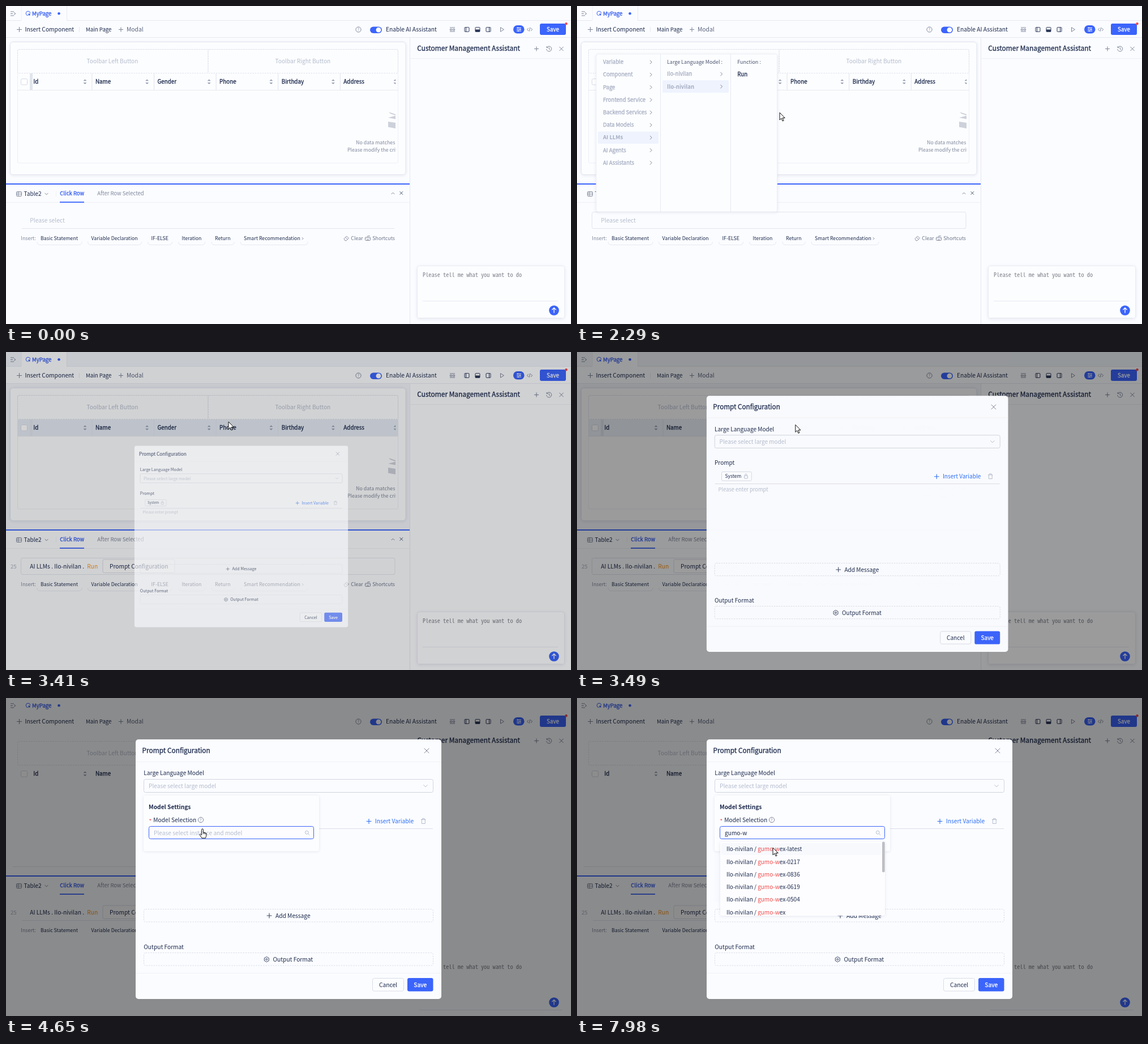
An HTML page for the animation above (8000 ms loop, 998 px wide and 561 px high).

```html
<!DOCTYPE html>
<html lang="en">
<head>
<meta charset="utf-8">
<title>Prompt setup</title>
<style>
html, body { margin: 0; width: 100%; height: 100%; overflow: hidden; background: #fbfcff; }
svg { display: block; width: 100vw; height: 100vh; }
text { font-family: "Noto Sans CJK SC", "Noto Sans CJK JP", "Noto Sans", sans-serif; white-space: pre; }
.mono { font-family: "Noto Sans Mono CJK SC", "Noto Sans Mono CJK JP", "Liberation Mono", monospace; }
.medium { stroke-width: .28; }
.dimmed .faint { visibility: hidden; }
</style>
</head>
<body>
<svg id="stage" viewBox="0 0 998 561" preserveAspectRatio="none"></svg>
<script>
const INK = '#1c2a4c', GREY = '#7f879b', PALE = '#b4bccd', LINE = '#e6e9f1', BLUE = '#3b64fb', RED = '#f04a4a';
const VENDOR = 'Ilo-nivilan';

// y is the middle of the capitals
const text = (x, y, size, str, fill = INK, weight = 400, more = '') =>
  `<text x="${x}" y="${y + size * 0.365}" font-size="${size}" fill="${fill}" font-weight="${weight}" ${more}>${str}</text>`;
const medium = (x, y, size, str, fill = INK, more = '') =>
  text(x, y, size, str, fill, 400, `class="medium" stroke="${fill}" ${more}`);
const rect = (x, y, w, h, fill = 'none', stroke = 'none', r = 0, more = '') =>
  `<rect x="${x}" y="${y}" width="${w}" height="${h}" rx="${r}" fill="${fill}" stroke="${stroke}" ${more}/>`;
const path = (d, stroke = GREY, w = 1, fill = 'none', more = '') =>
  `<path d="${d}" stroke="${stroke}" stroke-width="${w}" fill="${fill}" ${more}/>`;
const circle = (x, y, r, fill, stroke = 'none') =>
  `<circle cx="${x}" cy="${y}" r="${r}" fill="${fill}" stroke="${stroke}"/>`;
const hline = (x1, x2, y, c = LINE) => path(`M${x1} ${y}H${x2}`, c);
const vline = (x, y1, y2, c = LINE) => path(`M${x} ${y1}V${y2}`, c);
const group = (id, ...parts) => `<g id="${id}">${parts.join('')}</g>`;
const faint = (...parts) => `<g class="faint">${parts.join('')}</g>`;
const plus = (x, y, r, c = GREY) => path(`M${x - r} ${y}h${2 * r}M${x} ${y - r}v${2 * r}`, c, 1.1);
const cross = (x, y, r, c = GREY) => path(`M${x - r} ${y - r}l${2 * r} ${2 * r}M${x + r} ${y - r}l${-2 * r} ${2 * r}`, c, 1);
const right = (x, y, r, c = GREY) => path(`M${x - r / 2} ${y - r}l${r} ${r}l${-r} ${r}`, c);
const down = (x, y, r, c = GREY) => path(`M${x - r} ${y - r / 2}l${r} ${r}l${r} ${-r}`, c);
const help = (x, y) => circle(x, y, 4.6, 'none', GREY) + text(x, y, 7, '?', GREY, 400, 'text-anchor="middle"');
const dash = 'stroke-dasharray="2.5 1.8"';
const shade = 'filter="url(#shadow)"';
const middle = 'text-anchor="middle"';

function header() {
  return faint(hline(0, 998, 25.5)) + rect(27, 0, 80, 26, '#fbfcff') +
    faint(vline(27.5, 0, 25, '#f0f2f7'), vline(107.5, 0, 25)) +
    path('M8 10h6M8 13.500h4M8 17h6M14 11.500l3 2-3 2') +
    circle(39, 13, 3.8, 'none', BLUE) + rect(39, 13, 4, 4, BLUE, '#fbfcff', 1) +
    medium(46, 13, 9.6, 'MyPage', '#3059ee') + circle(93.5, 13.3, 2.3, BLUE) +
    plus(23.5, 41.5, 4.5) + text(33.5, 41.5, 10.25, 'Insert Component') + faint(vline(129.5, 37, 46)) +
    text(141, 41.5, 9.6, 'Main Page') + plus(203, 41.5, 4) + text(213, 41.5, 10.3, 'Modal', '#5c667f') +
    help(622.5, 41.5) + rect(643, 36.5, 21, 11.5, BLUE, 'none', 5.75) + circle(658, 42.2, 4.4, '#fff') +
    text(671, 41.5, 10.25, 'Enable AI Assistant') +
    path('M784 38h9M784 45h9M784.500 40.500h3v2.500h-3zM789.500 40.500h3v2.500h-3z') +
    [814, 833, 852].map(x => rect(x - 4, 37.7, 8, 7.6, 'none', '#2a3758', 1)).join('') +
    vline(812.5, 38, 45, '#2a3758') + rect(829, 41.5, 8, 4, '#2a3758') + vline(853.5, 38, 45, '#2a3758') +
    path('M873.500 37.800v7.400l6-3.700z') +
    rect(896, 34, 19.5, 14.5, BLUE, 'none', 7.2) +
    path('M902 38.500h8M902 41.300h8M902 44h8', '#fff') + path('M904 37.500v2M908 40.300v2M905 43v2', '#fff', 1.5) +
    path('M923 38.800l-2.600 2.600 2.600 2.600M927 38.800l2.600 2.600-2.600 2.600M925.800 37.800l-1.600 7') +
    rect(943, 31, 46, 20, BLUE, 'none', 3) + medium(966, 41.2, 9.8, 'Save', '#fff', middle) +
    circle(989.5, 31.3, 2.2, '#f4484d') + faint(hline(0, 998, 55.5));
}

function table() {
  const cols = ['Id', 'Name', 'Gender', 'Phone', 'Birthday', 'Address'];
  let s = faint(rect(7.5, 63.5, 698.5, 234, '#fcfdff', '#dfe4ee', 5, shade), rect(20.5, 76.5, 672, 200.5, 'none', '#eceff5', 3)) +
    hline(12, 702, 297.5, '#dfe4ee') + group('headTint', rect(20, 119, 673, 29, '#e6ecf5')) +
    rect(20.5, 76.5, 336.5, 42, 'none', '#dde1ea', 2, dash) + rect(357, 76.5, 335.5, 42, 'none', '#dde1ea', 2, dash) +
    text(142.5, 97.5, 10.1, 'Toolbar Left Button', PALE) + text(475.5, 97.5, 10.1, 'Toolbar Right Button', PALE) +
    rect(26.5, 128.5, 11, 10.5, '#fff', '#d5dae5', 2) + faint(hline(20, 693, 148.5), rect(42, 119, 5, 29, '#e1e5ee'));
  cols.forEach((c, i) => {
    const x = 48.3 + i * 109.6;
    s += medium(x, 133.3, 9.85, c);
    s += path(`M${x + 88.2} 132.300l3-3 3 3zM${x + 88.2} 134.900l3 3 3-3z`, 'none', 0, '#98a0b4', 'clip-path="url(#tableClip)"');
    if (i) s += faint(vline(x - 6, 119, 148, '#dfe3ec'));
  });
  return s + `<g clip-path="url(#tableClip)">` +
    path('M676 187l12 4v2l-9-3zM675 197l13-3.500v6zM675 204l13 2v10l-13-2.500z', 'none', 0, '#cdd1da') +
    text(618, 240.5, 8.85, 'No data matches', GREY) + text(603, 253.5, 8.75, 'Please modify the criteria', GREY) + '</g>';
}

function editor() {
  const chips = [[61, 67, 'Basic Statement'], [150.5, 83, 'Variable Declaration'], [256.5, 31, 'IF-ELSE'],
    [310.5, 35, 'Iteration'], [369, 28, 'Return'], [420, 107, 'Smart Recommendation']];
  return rect(0, 313, 713, 2, BLUE) +
    rect(18.5, 327.5, 9, 8, 'none', GREY, 1) + path('M18.500 330h9M18.500 332.700h9M21.500 328v7.500', GREY, 0.8) +
    text(31.5, 331, 10.1, 'Table2') + down(71.5, 331.5, 2.8) + faint(vline(88.5, 327, 336, '#eef0f5')) +
    medium(95.3, 331, 9.5, 'Click Row', '#3059ee') + text(161.3, 331, 9.45, 'After Row Selected', GREY) +
    path('M680.700 332l2.800-2.800 2.800 2.800') + cross(698.3, 330, 2.8, '#4d5871') +
    faint(hline(0, 713, 346.5, '#edf0f5')) + rect(95, 345.2, 43, 1.8, BLUE) +
    group('lineNo', text(8, 378, 9.6, '25', '#a9b0c0')) +
    hline(28, 686, 392.5, '#e1e5ed') + group('field', faint(rect(26.5, 363.5, 660.5, 29, 'none', '#e1e5ed', 3))) +
    group('hint', text(42.3, 378, 10.25, 'Please select', PALE)) +
    group('statement', text(42.3, 378, 10.2, `AI LLMs . ${VENDOR} .`), text(143.3, 378, 10.2, 'Run', '#f7941d'),
      rect(171, 366, 127, 23.5, '#fdfdff', '#d9dde7', 2.5), text(183, 378, 10.2, 'Prompt Configuration')) +
    text(26.3, 410, 8.9, 'Insert:', GREY) +
    chips.map(([x, w, s]) => faint(path(`M${x - 6} 416q0 5.500 6 5.500h${w}q6 0 6-5.500`, LINE)) + text(x, 410, 8.75, s)).join('') +
    right(524, 410.3, 2) +
    path('M597 410.500l4.500-4.500 4 3.500-4.500 4.500h-2zM599.500 408l4 4', GREY, 0.9) + text(609.3, 410, 8.8, 'Clear', '#6b7489') +
    rect(634.5, 408, 9, 5.5, 'none', GREY, 1) + path('M636 410h1M638.500 410h1M641 410h1M637 412h4M639 408v-2.500h4', GREY, 0.8) +
    text(647.3, 410, 8.8, 'Shortcuts', '#6b7489');
}

function assistant() {
  return faint(vline(713.5, 56, 561, '#e4e8f0')) + medium(726.3, 75, 11.9, 'Customer Management Assistant') +
    plus(937, 75.5, 4) + path('M955.500 73a4.500 4.500 0 1 1-.8 3M955 71v2.500h2.500M959.300 73v3l2 1') + cross(981, 75.5, 3.6) +
    faint(hline(714, 998, 92.5, '#edf0f5'), rect(726.5, 458.5, 260, 92.5, '#fcfdff', '#e9ecf3', 4, shade), hline(736, 975, 520.5)) +
    hline(730, 982, 550.5, '#e3e7ef') +
    text(736, 474, 10.3, 'Please tell me what you want to do', '#7c7f88', 400, 'class="mono"') +
    circle(968, 537, 8.8, BLUE) + path('M968 541.500v-8.500M964.500 536l3.500-3.500 3.500 3.500', '#fff', 1.3);
}

function menu() {
  const items = ['Variable', 'Component', 'Page', 'Frontend Service', 'Backend Services', 'Data Models', 'AI LLMs', 'AI Agents', 'AI Assistants'];
  const dim = '#a4acc0';
  return group('menu',
    `<rect id="pane" x="34" y="85" width="114" height="278" rx="3" fill="#fcfdff" stroke="#eceff5" ${shade}/>`,
    group('pick1', rect(37, 221.5, 107, 21.5, '#eff3fe', 'none', 2)),
    items.map((s, i) => (s === 'AI LLMs' ? text(46, 98.7 + i * 22.2, 9.5, s, dim, 700) : medium(46, 98.7 + i * 22.2, 9.5, s, dim)) +
      right(130.5, 99 + i * 22.2, 3.2)).join(''),
    group('col2', vline(147.5, 85, 363), text(159, 98.5, 8.95, 'Large Language Model :', '#4c5670'),
      group('pick2', rect(151, 131, 117, 22, '#eff3fe', 'none', 2)),
      medium(159, 120, 9.5, VENDOR, dim), text(159, 142, 9.6, VENDOR, dim, 700), right(255, 120, 3.2), right(255, 142, 3.2)),
    group('col3', vline(271.5, 85, 363), text(283.3, 98.5, 9, 'Function :', '#4c5670'), medium(283.3, 120, 9.7, 'Run')));
}

function modal() {
  return group('modal',
    rect(229, 73, 540, 458, '#fbfcff', 'none', 5),
    medium(240.6, 93, 11.85, 'Prompt Configuration'), cross(743, 93, 4.3), hline(229, 769, 112.5, '#f0f2f6'),
    text(243.3, 132.7, 10.2, 'Large Language Model'), rect(243.5, 143.5, 511, 23, '#fbfcff', '#d0d5df', 3),
    group('focus', rect(243.5, 143.5, 511, 23, 'none', '#a3c0dc', 3)),
    text(252, 155.3, 10.15, 'Please select large model', PALE), down(741, 155, 3.6, PALE),
    text(243.3, 192.7, 10.2, 'Prompt'), rect(256, 209, 53.5, 16, '#fcfdff', '#d5dae4', 2), text(262, 217, 8.6, 'System'),
    rect(296.5, 216, 6, 4.8, 'none', PALE, 0.7), path('M297.800 216v-1.500q0-1.700 1.700-1.700t1.700 1.700v1.500', PALE),
    plus(641, 217.5, 4.4, '#2a6df5'), text(651.8, 217.3, 10.2, 'Insert Variable', '#2a6df5'),
    path('M733 214.500h8.500M735.500 214.300v-1.700h3.500v1.700M734.300 214.500v7h6v-7', PALE),
    hline(244, 754, 230.5, '#d9dee8'), text(250, 241, 9.45, 'Please enter prompt', PALE),
    rect(243.5, 372.5, 511, 22.5, 'none', '#d9dde6', 3, dash), plus(465, 384, 4.4, '#3c4864'), text(476, 384, 10.2, 'Add Message'),
    text(243.3, 439, 10.2, 'Output Format'), rect(243.5, 449.5, 511, 22.5, 'none', '#d9dde6', 3, dash),
    path('M460.300 456.500l4 2.300v4.600l-4 2.300-4-2.300v-4.600z', '#3c4864'), circle(460.3, 461.1, 1.5, 'none', '#3c4864'),
    text(471.5, 461.3, 10.2, 'Output Format'), hline(229, 769, 485.5, '#f0f2f6'),
    rect(647.5, 494.5, 55, 22.5, '#fcfdff', '#d9dde6', 3), text(675, 506, 10.2, 'Cancel', INK, 400, middle),
    rect(709, 494, 45.5, 23.5, BLUE, 'none', 3), medium(731.7, 506, 10.2, 'Save', '#fff', middle));
}

function settings() {
  const models = ['vab-wex-latest', 'vab-wex', 'vob-glen-0712', 'vob-glen', 'vob-48k', 'loamfern-t4'];
  const row = i => 266.7 + i * 22.25;
  return group('glow', rect(243, 270, 276, 90, '#f8faff')) + group('settings',
    rect(243, 172, 310, 98, '#fcfdff', 'none', 4, shade),
    text(252, 192.5, 10.2, 'Model Settings', INK, 700), text(252.5, 217, 10, '*', RED),
    text(260.3, 215.3, 10.2, 'Model Selection'), help(344, 215),
    rect(252.5, 226.5, 291, 22, '#fdfdff', BLUE, 3),
    circle(531.3, 237.2, 2.9, 'none', PALE), path('M533.500 239.500l2.500 2.500', PALE),
    group('ask', text(261, 238, 10.2, 'Please select instance and model', PALE)),
    `<text id="typed" x="261" y="241.700" font-size="10.200" fill="${INK}"></text>`, group('caret', vline(0, 232, 244.5, INK))) +
  group('tree', group('narrow', rect(253, 253, 83, 131, '#fdfdff', 'none', 3, shade)),
    group('branch', rect(253, 253, 255, 131, '#fdfdff', 'none', 3, shade), vline(335.5, 253, 384, '#eef0f5'),
      rect(339, 256, 158, 21, '#f7f9fd', 'none', 2),
      `<g clip-path="url(#dropClip)">${models.map((m, i) => text(348, row(i), 10, m)).join('')}</g>`,
      rect(503.3, 253, 4.7, 11, '#bdbfc4', 'none', 2.3)),
    rect(255, 256, 77, 21.5, '#edf2fe', 'none', 2), text(264, 266.7, 9.8, VENDOR, INK, 700), right(319.5, 267, 2.8, PALE)) +
  group('found', rect(253, 253, 291, 131, '#fdfdff', 'none', 3, shade), rect(255, 256, 282, 21, '#f7f9fd', 'none', 2),
    `<g id="hits" clip-path="url(#dropClip)"></g>`, rect(539, 253.5, 4.7, 54, '#bdbfc4', 'none', 2.3));
}

function hits(key) {
  return ['-latest', '-0217', '-0836', '-0619', '-0504', ''].map((end, i) => {
    const rest = ('gumo-wex' + end).slice(key.length);
    return text(264, 266.7 + i * 22.25, 10, `${VENDOR} / <tspan fill="${RED}">${key}</tspan>${rest}`);
  }).join('');
}

const stage = document.getElementById('stage');
stage.innerHTML = `<defs>
  <filter id="shadow" x="-10%" y="-10%" width="120%" height="125%"><feDropShadow dx="0" dy="1" stdDeviation="2.5" flood-color="#2b3a66" flood-opacity=".09"/></filter>
  <clipPath id="tableClip"><rect x="20" y="119" width="668.300" height="158"/></clipPath>
  <clipPath id="dropClip"><rect x="253" y="253" width="291" height="131"/></clipPath></defs>` +
  rect(0, 0, 998, 561, '#fbfcff') +
  group('tint', rect(0, 0, 998, 25, '#eff3f9'), rect(0, 56, 713, 257, '#f1f4fa')) +
  header() + table() + editor() + assistant() + menu() +
  group('mask', rect(0, 0, 998, 561, '#000')) + modal() + settings() +
  group('cursor',
    group('arrow', path('M0 0V13l3-2.800 2.100 4.800 2-.9-2-4.600h4.100z', '#111', 1, '#fff')),
    group('hand', path('M-1.400 1.200a1.400 1.400 0 0 1 2.800 0V6l4 .9q1.800.4 1.600 2.400l-.6 4-.9 2.700h-6.600l-3.400-5.200q-.9-1.500.2-1.900.9-.3 1.500.6l1.400 1.400z', '#111', 1, '#fff'),
      path('M1.400 6v3M3.400 6.700v2.500M5.300 7.200v2.300', '#111', 0.8)));

const el = {};
stage.querySelectorAll('[id]').forEach(e => { el[e.id] = e; });

const clamp = v => Math.max(0, Math.min(1, v));
const ramp = (t, a, b) => clamp((t - a) / (b - a));
const within = (t, a, b) => t >= a && t < b;
const fade = (id, v) => {
  el[id].setAttribute('opacity', +v);
  el[id].setAttribute('display', v > 0 ? 'inline' : 'none');
};

// time, x, y
const route = [[40, 235, 497], [240, 150, 377], [890, 150, 377], [1290, 100, 231], [1450, 106, 231], [1690, 215, 142],
  [1770, 215, 142], [1970, 292, 119], [2210, 292, 119], [2290, 358, 188], [2570, 320, 320], [2930, 222, 380],
  [3090, 222, 380], [3370, 355, 101], [3410, 393, 123], [3730, 347, 157], [4250, 347, 157], [4730, 347, 237],
  [4970, 347, 237], [5250, 300, 265], [5570, 347, 266], [5770, 347, 266], [5890, 347, 264], [7900, 347, 264], [7980, 346, 264]];

function pointer(t) {
  let i = route.findIndex(p => p[0] > t);
  if (i < 0) return route[route.length - 1].slice(1);
  if (i === 0) i = 1;
  const [a, b] = [route[i - 1], route[i]];
  const p = ramp(t, a[0], b[0]), e = p * p * (3 - 2 * p);
  return [a[1] + (b[1] - a[1]) * e, a[2] + (b[2] - a[2]) * e];
}

let lastKey = null;
function draw(t) {
  fade('field', within(t, 80, 2450) || t >= 3400);
  fade('lineNo', t < 2450 ? ramp(t, 40, 200) * (1 - ramp(t, 930, 1090)) : 1);
  fade('hint', t < 2450);
  fade('statement', t >= 2450);

  const second = ramp(t, 1270, 1370), third = ramp(t, 1730, 1850);
  fade('menu', ramp(t, 530, 690) * (1 - ramp(t, 2330, 2450)));
  el.pane.setAttribute('width', third ? 319.5 : second ? 238 : 114);
  for (const id of ['col2', 'pick1']) fade(id, second);
  fade('col3', third);
  fade('pick2', t >= 1650);

  // the dialog grows out of the clicked button
  const p = ramp(t, 3371, 3571), e = 1 - (1 - p) ** 4.5;
  fade('mask', 0.45 * (1 - (1 - p) ** 2.2));
  fade('modal', e);
  el.modal.setAttribute('transform', `translate(222 380) scale(${0.2 + 0.8 * e}) translate(-222 -380)`);
  const tint = p > 0 ? 1 - ramp(t, 3450, 3571) : 0;
  fade('tint', tint);
  fade('headTint', tint);
  stage.classList.toggle('dimmed', p === 1);
  fade('focus', within(t, 3610, 4250));

  const key = t < 7010 ? '' : t < 7500 ? 'gumo' : 'gumo-w';
  if (key !== lastKey) {
    el.typed.textContent = key;
    el.hits.innerHTML = key ? hits(key) : '';
    lastKey = key;
  }
  fade('settings', ramp(t, 4050, 4210));
  fade('glow', ramp(t, 4930, 5090));
  fade('ask', !key);
  fade('caret', within(t, 4930, 7780));
  el.caret.setAttribute('transform', `translate(${261.5 + (key ? el.typed.getComputedTextLength() : 0)} 0)`);
  fade('tree', key ? 0 : ramp(t, 4930, 5090));
  fade('narrow', t < 5250);
  fade('branch', ramp(t, 5210, 5330));
  fade('found', key !== '');

  const [x, y] = pointer(t), hand = within(t, 3560, 7970);
  el.cursor.setAttribute('transform', `translate(${x} ${y})`);
  fade('arrow', t >= 40 && !hand);
  fade('hand', hand);
}

let start = null;
function tick(now) {
  if (start === null) start = now;
  draw((now - start) % 8000);
  requestAnimationFrame(tick);
}
draw(0);
requestAnimationFrame(tick);
</script>
</body>
</html>
```
